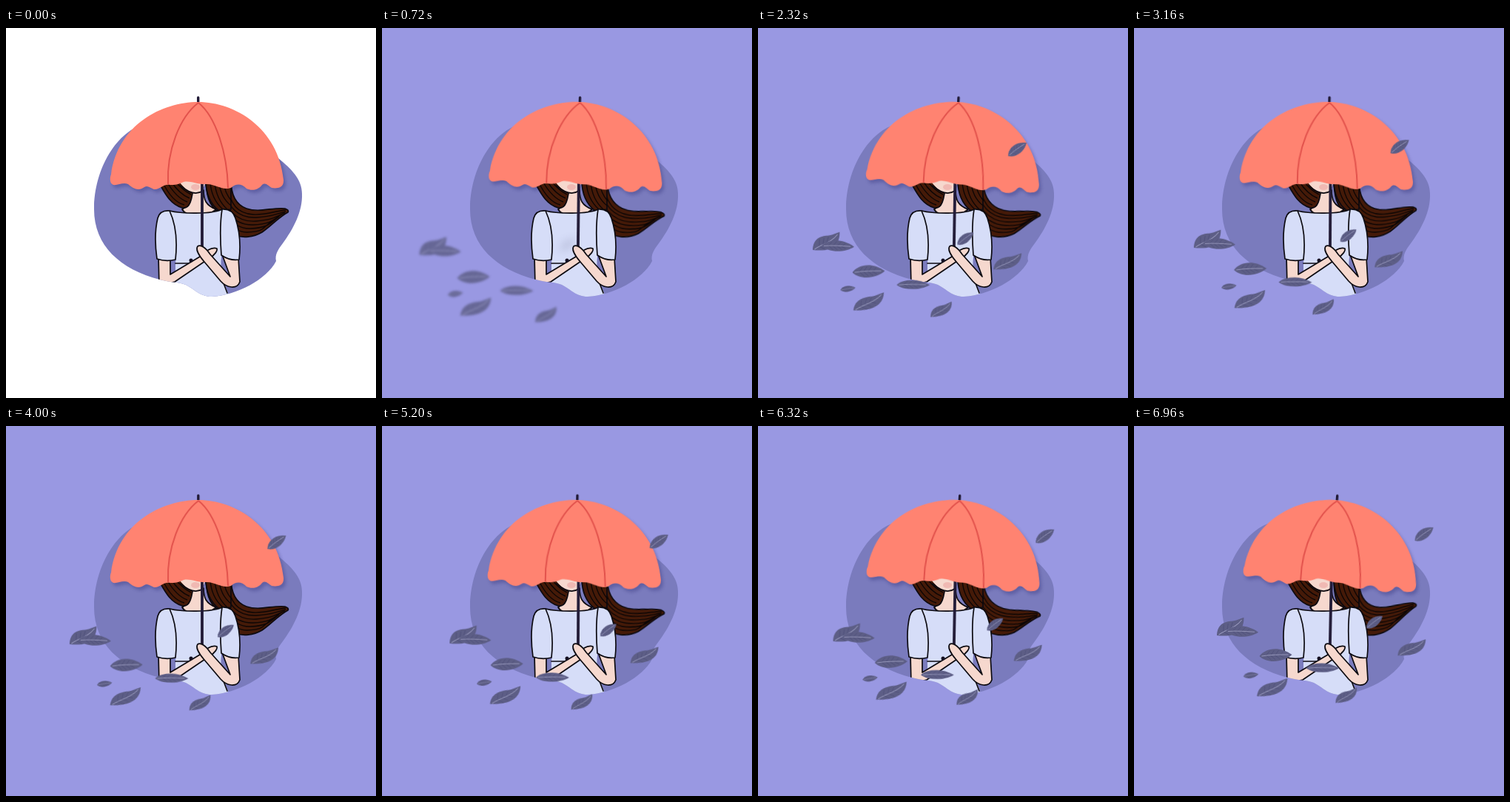
Recreate the animation shown at these times as an HTML page without scripts. Size 500 px wide and 500 px high, loop 7000 ms.

```html
<!DOCTYPE html>
<html lang="en">
<head>
<meta charset="utf-8">
<title>Girl in the wind</title>
<style>
html, body { margin: 0; width: 100%; height: 100%; overflow: hidden; background: #fff; }
svg { display: block; width: 100vw; height: 100vh; }
.bg { animation: fade 7s linear infinite; }
.sway { --a: 4.4deg; transform-origin: 264px 290px; animation: sway 7s cubic-bezier(.37, 0, .63, 1) infinite; }
.shaft { --a: 1.2deg; }
.tail { transform-origin: 325px 245px; animation: tail 7s ease-in-out infinite; }
.ink { stroke: #0c0a10; stroke-width: 1.7; stroke-linecap: round; stroke-linejoin: round; }
.line { fill: none; }
.dress { fill: #d6ddf8; }
.skin { fill: #f6d8ce; }
.hair { fill: #451a08; }
.strand { fill: none; stroke: #0d0605; stroke-width: 1.4; }
.shadow { fill: #3f3f86; opacity: .45; filter: blur(2px); }
.low, .mid, .high { animation: low 7s linear infinite; }
.mid { animation-name: mid; }
.high { animation-name: high; }
.s1, .s2, .s3, .s4 { animation: s1 7s linear infinite; }
.s2 { animation-name: s2; }
.s3 { animation-name: s3; }
.s4 { animation-name: s4; }

@keyframes fade { 0% { opacity: 0; } 10%, 100% { opacity: 1; } }
@keyframes sway {
  0%, 59.7% { transform: rotate(0deg); }
  20%, 100% { transform: rotate(var(--a)); }
}
@keyframes tail {
  0%, 57.1% { transform: skewY(0deg); }
  21.1% { transform: skewY(11deg); }
  47% { transform: skewY(-2.5deg); }
  57.1%, 74.3% { animation-timing-function: linear; }
  74.3% { transform: skewY(5deg); }
  83% { transform: skewY(9deg); }
  90.3% { transform: skewY(8deg); }
  99.4%, 100% { transform: skewY(-5.5deg); }
}
/* drift: every leaf travels --x, --y along a shared gust curve */
@keyframes low {
  0% { transform: translate(calc(var(--x) * -.55), calc(var(--y) * -.25)); }
  10.3% { transform: translate(calc(var(--x) * -.28), calc(var(--y) * -.12)); }
  21.1% { transform: translate(0, 0); }
  30.9% { transform: translate(calc(var(--x) * .18), calc(var(--y) * .17)); }
  45.1% { transform: translate(calc(var(--x) * .35), calc(var(--y) * .34)); }
  57.1% { transform: translate(calc(var(--x) * .455), calc(var(--y) * .44)); }
  74.3% { transform: translate(calc(var(--x) * .57), calc(var(--y) * .49)); }
  82.3% { transform: translate(calc(var(--x) * .64), calc(var(--y) * .54)); }
  90.3% { transform: translate(calc(var(--x) * .78), calc(var(--y) * .63)); }
  99.4%, 100% { transform: translate(var(--x), var(--y)); }
}
@keyframes mid {
  0% { transform: translate(calc(var(--x) * -.55), calc(var(--y) * -.25)); }
  10.3% { transform: translate(calc(var(--x) * -.28), calc(var(--y) * -.12)); }
  21.1% { transform: translate(0, 0); }
  30.9% { transform: translate(calc(var(--x) * .18), calc(var(--y) * .19)); }
  45.1% { transform: translate(calc(var(--x) * .355), calc(var(--y) * .37)); }
  57.1% { transform: translate(calc(var(--x) * .46), calc(var(--y) * .42)); }
  74.3% { transform: translate(calc(var(--x) * .57), calc(var(--y) * .5)); }
  82.3% { transform: translate(calc(var(--x) * .69), calc(var(--y) * .62)); }
  90.3% { transform: translate(calc(var(--x) * .86), calc(var(--y) * .78)); }
  99.4%, 100% { transform: translate(var(--x), var(--y)); }
}
@keyframes high {
  0% { transform: translate(calc(var(--x) * -.55), calc(var(--y) * -.25)); }
  10.3% { transform: translate(calc(var(--x) * -.28), calc(var(--y) * -.12)); }
  21.1% { transform: translate(0, 0); }
  30.9% { transform: translate(calc(var(--x) * .2), calc(var(--y) * .19)); }
  45.1% { transform: translate(calc(var(--x) * .39), calc(var(--y) * .38)); }
  57.1% { transform: translate(calc(var(--x) * .515), calc(var(--y) * .52)); }
  74.3% { transform: translate(calc(var(--x) * .67), calc(var(--y) * .57)); }
  82.3% { transform: translate(calc(var(--x) * .79), calc(var(--y) * .73)); }
  90.3% { transform: translate(calc(var(--x) * .92), calc(var(--y) * .88)); }
  99.4%, 100% { transform: translate(var(--x), var(--y)); }
}
/* appear: from soft to sharp, one after another */
@keyframes s1 {
  0%, 2% { opacity: 0; filter: blur(6px); }
  10% { opacity: .8; }
  14%, 100% { opacity: 1; filter: blur(0); }
}
@keyframes s2 {
  0%, 8% { opacity: 0; filter: blur(6px); }
  20% { opacity: 1; }
  24%, 100% { opacity: 1; filter: blur(0); }
}
@keyframes s3 {
  0%, 11% { opacity: 0; filter: blur(6px); }
  23% { opacity: 1; }
  28%, 100% { opacity: 1; filter: blur(0); }
}
@keyframes s4 {
  0%, 13% { opacity: 0; filter: blur(6px); }
  22% { opacity: 1; }
  32%, 100% { opacity: 1; filter: blur(0); }
}
</style>
</head>
<body>
<svg viewBox="0 0 500 500" xmlns="http://www.w3.org/2000/svg">
  <defs>
    <path id="blob" d="M190 129C150 138 119 190 119 245C119 294 154 326 208 340C222 344 233 343 243 347C255 353 262 363 278 363C312 361 352 340 365 315C363 306 368 299 374 291C388 272 401 248 400 224C400 204 385 190 368 176L300 130Z"/>
    <path id="canopy" d="M260 100C309 100 368 135 375 205C376 217 365 217 359 216C354 213 351 208 346 212C340 220 331 220 325 217C318 210 311 210 304 216C292 220 283 211 272 211C258 212 250 206 240 208C232 212 228 212 222 212C212 210 208 219 200 218C195 216 191 212 187 215C179 221 172 217 165 211C158 208 151 213 145 212C140 210 140 203 142 198C151 131 210 100 260 100Z"/>
    <g id="leaf">
      <path fill="#5d5e86" d="M-22 1C-15 -9 4 -14 22 -1C11 9 -11 12 -22 1Z"/>
      <path fill="none" stroke="#4d4e78" stroke-width=".7" d="M-13 0l5 -6M-7 0l5 -7M-1 0l5 -7M5 0l5 -5M-13 0l7 6M-7 0l7 6M-1 0l7 5M5 0l6 3"/>
      <path fill="none" stroke="#a4a5c8" stroke-width=".8" d="M-19 1C-8 -1 5 -1 17 -1"/>
    </g>
    <g id="curl">
      <path fill="#5d5e86" d="M-23 5C-18 -7 -8 -8 2 -7C10 -5 16 -7 23 -7C19 6 8 10 -5 9C-12 8 -17 7 -23 5Z"/>
      <path fill="none" stroke="#4d4e78" stroke-width=".7" d="M-12 3l3 -8M-6 2l4 -7M0 1l5 -6M-12 3l7 5M-5 2l7 5M3 1l6 3"/>
      <path fill="none" stroke="#a4a5c8" stroke-width=".8" d="M-20 5C-8 1 6 3 19 -5"/>
    </g>
    <clipPath id="inside"><use href="#blob"/></clipPath>
  </defs>

  <g class="bg">
    <rect width="500" height="500" fill="#9998e2"/>
    <g class="sway"><use href="#canopy" class="shadow" x="3" y="4"/></g>
  </g>
  <use href="#blob" fill="#7a7bbd"/>

  <g clip-path="url(#inside)">
    <g class="sway"><use href="#canopy" class="shadow" x="3" y="4"/></g>
    <g class="tail">
      <path class="hair ink" d="M270 200L304 205C304 226 311 239 325 244C343 250 360 242 377 244Q383 246 381 249C368 256 358 268 346 276C334 283 320 284 310 280L288 250C274 240 270 226 270 200Z"/>
      <path class="strand" d="M300 212C302 240 316 251 334 252S364 247 378 246M295 212C298 245 316 257 338 256S365 251 378 248M290 212C294 245 312 263 338 261S365 254 377 250M285 212C290 245 308 267 334 266S362 258 374 251M280 212C285 240 304 272 330 271S357 263 369 255M275 212C279 236 302 277 326 276S345 271 358 262"/>
    </g>
    <path class="skin ink" d="M250 219C251 234 246 240 238 245C244 256 272 256 284 245C270 240 267 232 267 219Z"/>
    <path class="hair ink" d="M270 205C270 225 276 238 288 247L304 245V205Z"/>
    <path class="strand" d="M276 208C277 225 283 236 293 245M282 208C283 222 288 235 299 245M288 208C289 221 294 232 304 240M294 208C295 219 299 227 305 234"/>
    <path class="hair ink" d="M202 203C211 212 216 236 238 243C248 245 252 234 254 205Z"/>
    <path class="strand" d="M211 207C219 224 228 236 241 239M217 207C225 221 234 231 245 235M223 207C230 218 238 226 248 230M229 207C236 216 242 221 250 225M235 207Q243 216 251 219"/>
    <path class="skin" d="M231 203C239 216 249 224 257 224C265 223 270 213 270 200Z"/>
    <ellipse cx="256" cy="215" rx="6" ry="4" fill="#efb2ad" opacity=".8"/>
    <path class="ink line" d="M236 213C246 222 256 227 266 220" stroke-width="1"/>

    <path class="dress" d="M221 247C236 251 278 252 292 245L291 310Q288 330 300 358L303 380H210L229 340L229 318C232 290 228 266 221 247Z"/>
    <path class="ink line" d="M221 247C236 251 278 252 292 245M229 318H253"/>
    <path class="ink line" d="M291 337L299 358" stroke-width="2.5"/>

    <path class="sway shaft" d="M265 205V297" fill="none" stroke="#211a36" stroke-width="3.800"/>
    <path class="skin ink" d="M206 309L207 348L228 343L275 311C282 307 286 301 285 298C279 296 270 301 262 309L222 333V312Z"/>
    <path class="dress ink" d="M221 247Q208 246 205 257C200 278 202 298 204 312Q216 316 229 313C232 286 230 266 221 247Z"/>
    <path class="skin ink" d="M292 306L303 336L276 306C270 297 263 292 259 295C256 299 261 308 268 316L290 342C298 351 312 354 316 343L314 310Z"/>
    <path class="dress ink" d="M292 245Q306 244 310 257C317 278 317 296 315 313Q303 315 291 307C289 281 289 264 292 245Z"/>
    <circle cx="250" cy="314" r="2.500" fill="#151022"/>
  </g>

  <g class="sway">
    <path d="M259.700 94V103" stroke="#211a36" stroke-width="3.400" stroke-linecap="round"/>
    <use href="#canopy" fill="#ff8371"/>
    <path fill="none" stroke="#e2524c" stroke-width="2" d="M260 101C235 120 217 165 219 211M260 101C284 120 299 170 300 216"/>
  </g>

  <g class="s1">
    <g class="low" style="--x:48px;--y:-21px">
      <use href="#curl" transform="translate(82.500 293) rotate(-15) scale(.9 1.150)"/>
      <use href="#leaf" transform="translate(98 299) rotate(4) scale(1 .87)"/>
    </g>
    <g class="low" style="--x:53px;--y:-24px"><use href="#leaf" transform="translate(138.500 334)"/></g>
    <g class="mid" style="--x:46px;--y:-20px"><use href="#leaf" transform="translate(112 357) rotate(-6) scale(.47 .48)"/></g>
    <g class="mid" style="--x:47px;--y:-21px"><use href="#curl" transform="translate(140 375) rotate(-16) scale(1.010 1)"/></g>
    <g class="low" style="--x:57px;--y:-25px"><use href="#leaf" transform="translate(198 352) rotate(2) scale(1.020 .74)"/></g>
    <g class="high" style="--x:51px;--y:-21px"><use href="#curl" transform="translate(236 385.500) rotate(-20) scale(.74 .8)"/></g>
  </g>
  <g class="s2"><g class="high" style="--x:58px;--y:-25px"><use href="#leaf" transform="translate(267 290) rotate(-34) scale(.62 .7)"/></g></g>
  <g class="s3"><g class="low" style="--x:48px;--y:-20px"><use href="#curl" transform="translate(327.500 320) rotate(-15) scale(.92 .94)"/></g></g>
  <g class="s4"><g class="high" style="--x:54px;--y:-23px"><use href="#leaf" transform="translate(338 169) rotate(-33) scale(.7 .8)"/></g></g>
</svg>
</body>
</html>
```
